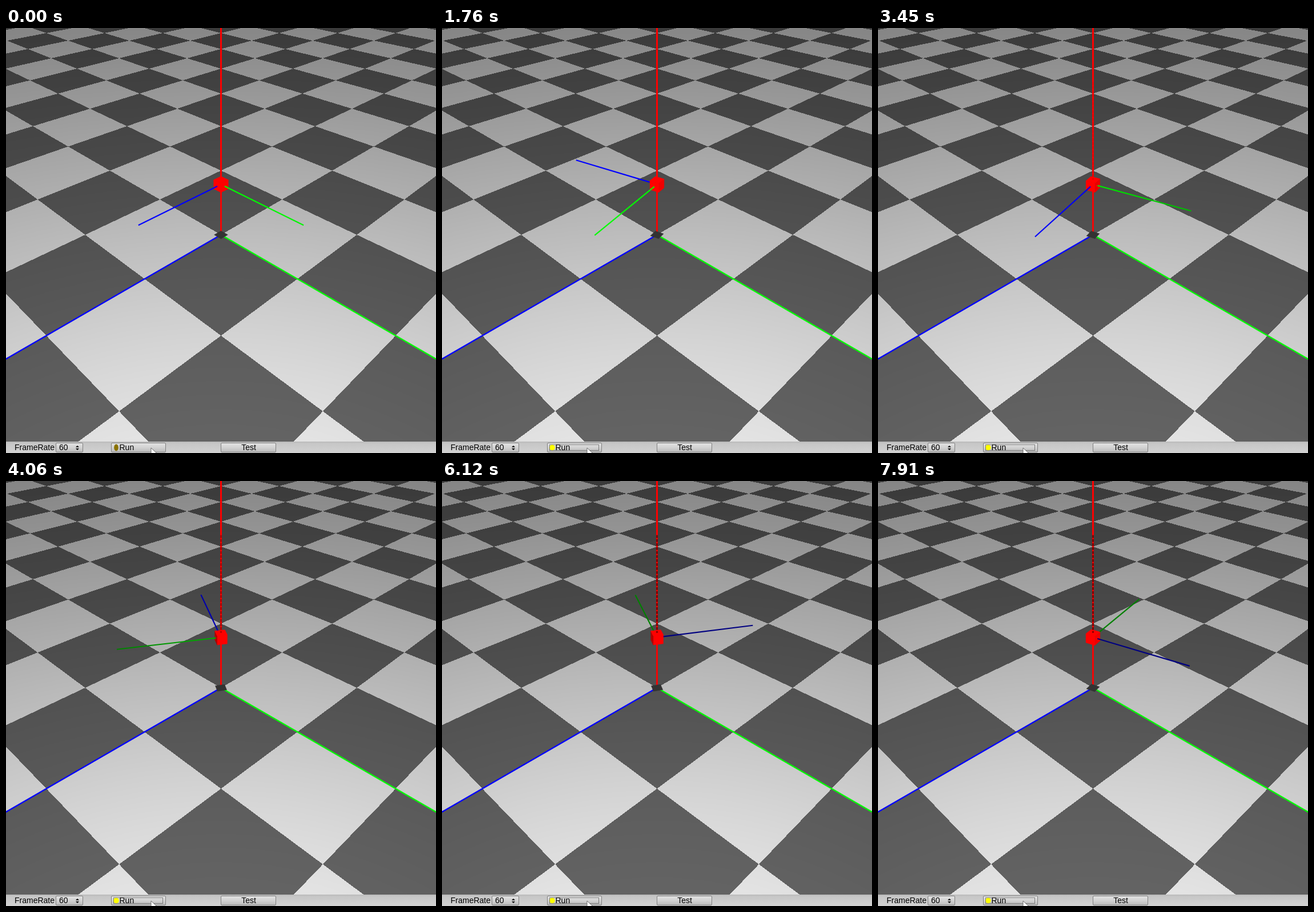
An HTML page with a canvas for the animation above (7990 ms loop, 753x744 px).

```html
<!DOCTYPE html>
<html lang="en">
<head>
<meta charset="utf-8">
<title>Spinning axes</title>
<style>
  html, body { margin: 0; width: 100%; height: 100%; overflow: hidden; background: #c9c9c9; }
  canvas { display: block; }
</style>
</head>
<body>
<canvas id="stage" width="753" height="744"></canvas>
<script>
const W = 753, H = 744, VIEW_H = 724, LOOP = 7990, START = 660;
const ctx = document.getElementById('stage').getContext('2d');

// Camera at (3,3,3) looking at the world centre, 45 degree field of view
const EYE = 3, CX = W / 2, CY = VIEW_H / 2;
const FOCAL = CY / Math.tan(Math.PI / 8);
const S2 = Math.SQRT2, S3 = Math.sqrt(3), S6 = Math.sqrt(6);
const LIFT = 0.6, HALF = 0.05;

// Runs of evenly spaced updates: first time, last time, count
const RUNS = [
  [660, 1440, 11], [1510, 1760, 4], [1830, 2290, 7], [2380, 2770, 6],
  [2880, 3060, 3], [3200, 3990, 10], [4060, 4150, 2], [4330, 4970, 9],
  [5050, 5120, 2], [5190, 5970, 11], [6050, 6120, 2], [6220, 6760, 8],
  [6900, 7670, 11], [7740, 7910, 3]
];

function heldTime(t) {
  let held = 0;
  for (const [from, to, n] of RUNS) {
    if (t < from) break;
    const step = (to - from) / (n - 1);
    held = from + step * Math.min(n - 1, Math.floor((t - from) / step + 0.01));
  }
  return held;
}

// Spin-up towards 4 rad/s
function spin(t) {
  const s = Math.max(0, t - START) / 1000, tau = 1.43;
  return 4 * (s - tau * (1 - Math.exp(-s / tau)));
}

function project([x, y, z]) {
  const k = FOCAL / (EYE * S3 - (x + y + z) / S3);
  return [CX + k * (y - x) / S2, CY - k * (2 * z - x - y) / S6];
}

// Ambient half plus a lamp at the camera
function facing(p, n) {
  const l = p.map(v => EYE - v);
  return (l[0] * n[0] + l[1] * n[1] + l[2] * n[2]) / Math.hypot(...l);
}
const lit = (p, n) => Math.min(1, 0.5 + Math.max(0, facing(p, n)));
const tint = (rgb, k) => `rgb(${rgb.map(v => Math.round(v * k))})`;

const RED = [255, 0, 0], GREEN = [0, 255, 0], BLUE = [0, 0, 255];

function line(a, b, color, width) {
  const p = project(a), q = project(b);
  ctx.strokeStyle = color;
  ctx.lineWidth = width;
  ctx.beginPath();
  ctx.moveTo(...p);
  ctx.lineTo(...q);
  ctx.stroke();
}

function poly(points, color) {
  ctx.fillStyle = ctx.strokeStyle = color;
  ctx.lineWidth = 0.5;
  ctx.beginPath();
  points.forEach(p => ctx.lineTo(...project(p)));
  ctx.closePath();
  ctx.fill();
  ctx.stroke();
}

function shadedLine(a, b, rgb, n, width) {
  const g = ctx.createLinearGradient(...project(a), ...project(b));
  g.addColorStop(0, tint(rgb, lit(a, n)));
  g.addColorStop(1, tint(rgb, lit(b, n)));
  line(a, b, g, width);
}

function makeFloor() {
  const c = document.createElement('canvas');
  c.width = W;
  c.height = VIEW_H;
  const g = c.getContext('2d'), img = g.createImageData(W, VIEW_H);
  for (let py = 0, i = 0; py < VIEW_H; py++) {
    for (let px = 0; px < W; px++, i += 4) {
      const a = (px + 0.5 - CX) / FOCAL, b = (CY - py - 0.5) / FOCAL;
      const dx = -1 / S3 - a / S2 - b / S6;
      const dy = -1 / S3 + a / S2 - b / S6;
      const dz = -1 / S3 + 2 * b / S6;
      const t = -EYE / dz;
      const dark = (Math.floor(EYE + t * dx) + Math.floor(EYE + t * dy)) % 2 === 0;
      const shade = (102 - 150 * dz / Math.hypot(dx, dy, dz)) * (dark ? 0.435 : 1);
      img.data[i] = img.data[i + 1] = img.data[i + 2] = shade;
      img.data[i + 3] = 255;
    }
  }
  g.putImageData(img, 0, 0);
  return c;
}
const floor = makeFloor();

function drawCube(u, v) {
  const at = (a, b, c) => [0, 1, 2].map(i =>
    HALF * (a * u[i] + b * v[i]) + (i === 2 ? LIFT + HALF * c : 0));
  const corners = [[1, 1], [1, -1], [-1, -1], [-1, 1]];
  corners.forEach(([a, b], i) => {
    const [c, d] = corners[(i + 1) % 4];
    const m = [(a + c) / 2, (b + d) / 2];
    const n = [0, 1, 2].map(k => m[0] * u[k] + m[1] * v[k]);
    const mid = at(m[0], m[1], 0);
    if (facing(mid, n) > 0)
      poly([at(a, b, 1), at(c, d, 1), at(c, d, -1), at(a, b, -1)], tint(RED, lit(mid, n)));
  });
  poly(corners.map(([a, b]) => at(a, b, 1)), '#f00');
}

function drawScene(angle) {
  const c = Math.cos(angle), s = Math.sin(angle);
  const u = [c, -s, 0], v = [s, c, 0];
  const arm = (d, rgb) => shadedLine(
    [d[0] * HALF, d[1] * HALF, LIFT], [d[0], d[1], LIFT], rgb, v, 2.2);
  const arms = [[u, BLUE], [v, GREEN]];
  const near = ([d]) => d[0] + d[1] > 0;

  ctx.drawImage(floor, 0, 0);
  arms.filter(a => !near(a)).forEach(a => arm(...a));
  line([0, 0, 0], [4, 0, 0], '#00f', 2.5);
  line([0, 0, 0], [0, 4, 0], '#0f0', 2.5);
  line([0, 0, 0], [0, 0, 3], '#f00', 2.8);
  poly([[1, 1], [1, -1], [-1, -1], [-1, 1]].map(([a, b]) =>
    [HALF * (a * u[0] + b * v[0]), HALF * (a * u[1] + b * v[1]), 0]), '#333');
  drawCube(u, v);
  line([0, 0, LIFT + HALF], [0, 0, 3], '#f00', 2.8);
  // The two coincident upright axes flicker through each other
  ctx.setLineDash([5, 2]);
  shadedLine([0, 0, LIFT + 1], [0, 0, LIFT + HALF], RED, v, 2.8);
  ctx.setLineDash([]);
  arms.filter(near).forEach(a => arm(...a));
}

function box(x, w) {
  const g = ctx.createLinearGradient(0, 726, 0, 743);
  g.addColorStop(0, '#e4e4e4');
  g.addColorStop(0.5, '#d2d2d2');
  g.addColorStop(1, '#b8b8b8');
  ctx.fillStyle = g;
  ctx.strokeStyle = '#808080';
  ctx.lineWidth = 1;
  ctx.beginPath();
  ctx.roundRect(x + 0.5, 726.5, w - 1, 16, 1.5);
  ctx.fill();
  ctx.stroke();
}

function label(text, x, align = 'left') {
  ctx.fillStyle = '#000';
  ctx.textAlign = align;
  ctx.fillText(text, x, 739);
}

function shape(points, color) {
  ctx.fillStyle = color;
  ctx.beginPath();
  points.forEach(p => ctx.lineTo(...p));
  ctx.closePath();
  ctx.fill();
}

function drawBar(on) {
  const g = ctx.createLinearGradient(0, VIEW_H, 0, H);
  g.addColorStop(0, '#b8b8b8');
  g.addColorStop(0.15, '#c6c6c6');
  g.addColorStop(1, '#d2d2d2');
  ctx.fillStyle = g;
  ctx.fillRect(0, VIEW_H, W, H - VIEW_H);
  ctx.font = '14px "Liberation Sans", Arial, sans-serif';

  label('FrameRate', 15);
  box(87, 48);
  label('60', 93);
  shape([[122, 734], [125, 731], [128, 734]], '#000');
  shape([[122, 736], [125, 739], [128, 736]], '#000');

  box(184, 96);
  ctx.beginPath();
  ctx.ellipse(193, 734.5, on ? 4.8 : 3.8, on ? 5 : 6, 0, 0, 2 * Math.PI);
  ctx.fillStyle = on ? '#ff0' : '#8a7200';
  ctx.fill();
  if (on) {
    ctx.strokeStyle = '#222';
    ctx.lineWidth = 1;
    ctx.setLineDash([1, 1]);
    ctx.strokeRect(188.5, 729.5, 86, 10);
    ctx.setLineDash([]);
  }
  label('Run', 198.5);

  box(376, 97);
  label('Test', 425, 'center');

  // Pointer, cut off by the lower edge
  shape([[254, 735], [254, 748], [257, 745], [264, 744.5]], '#fff');
  ctx.strokeStyle = '#555';
  ctx.lineWidth = 0.8;
  ctx.stroke();
}

function frame(now) {
  const t = now % LOOP;
  drawScene(spin(heldTime(t)));
  drawBar(t >= START);
  requestAnimationFrame(frame);
}
requestAnimationFrame(frame);
</script>
</body>
</html>
```
